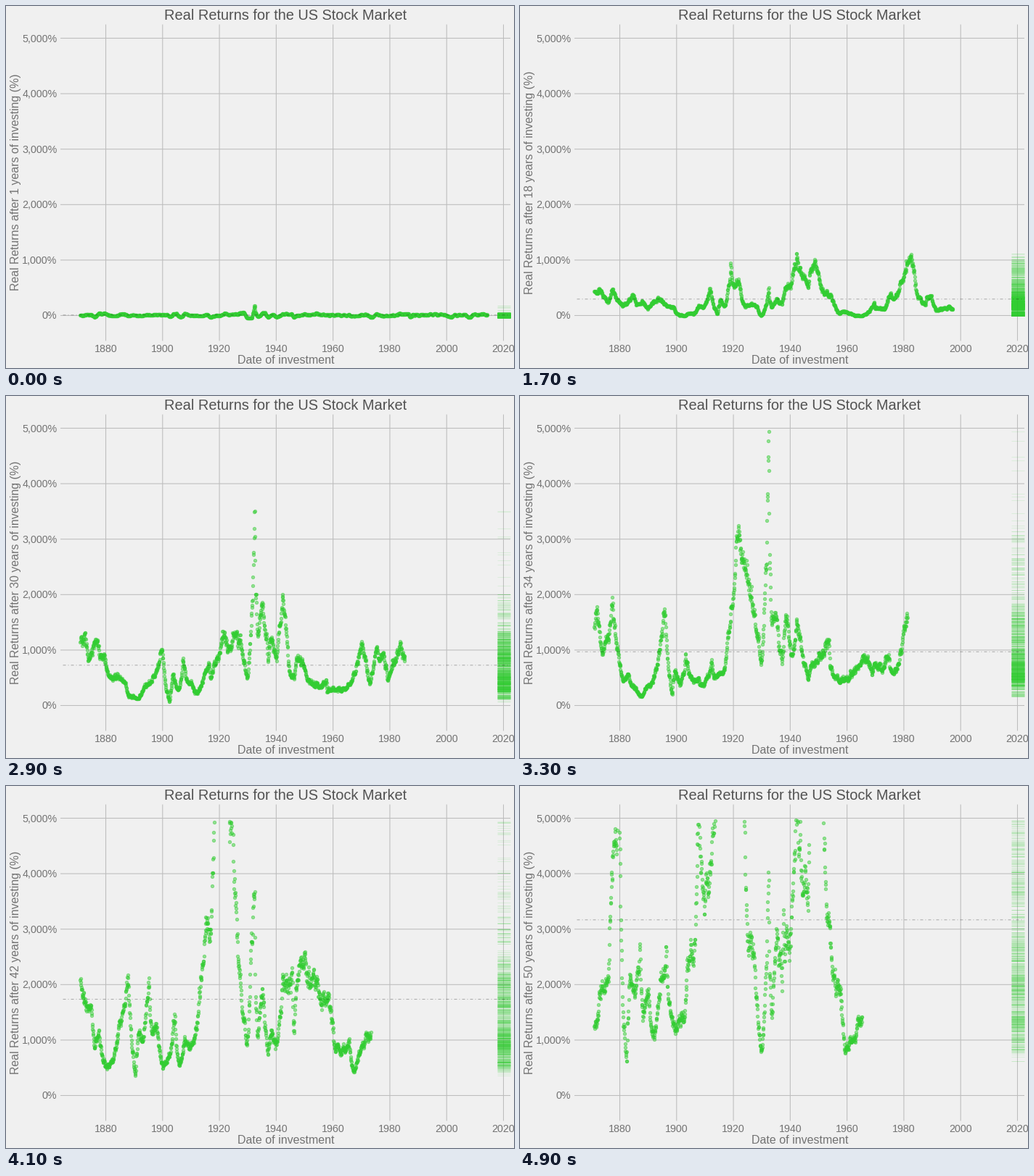
These frames come from a looping animation (700 by 500 pixels, 5 s). A matplotlib script:

```python
import matplotlib.pyplot as plt
import numpy as np
from matplotlib.animation import FuncAnimation

WIDTH, HEIGHT, DPI = 700, 500, 100
PX = 72 / DPI  # points per pixel
FRAMES, INTERVAL = 50, 100
LEFT, RIGHT, TOP, BOTTOM = 78.5, 695, 25.5, 459
TICK, RUG_LEFT = 3.5, 676.5
BACKGROUND, GRID, LABEL, TITLE, GREEN = "#f0f0f0", "#bdbdbd", "#737373", "#525252", "#32cd32"
plt.rcParams["font.family"] = "Liberation Sans"

# Major turning points of the inflation-adjusted price level
PRICES = {
    1871: 36, 1876: 41, 1877.42: 26.5, 1881.42: 70, 1885: 51, 1887.4: 72,
    1892: 75, 1893.58: 58, 1897: 65, 1902.67: 107, 1903.75: 75, 1906: 116,
    1907.83: 70, 1909.58: 108, 1913: 95, 1915: 74, 1916.83: 89, 1918: 50,
    1920.92: 36, 1927: 77, 1929.67: 181, 1930.25: 145, 1932.42: 35,
    1932.67: 62, 1933.5: 86, 1935.17: 62, 1937.08: 128, 1938.25: 72,
    1939.75: 90, 1942.25: 49, 1946.33: 101, 1947: 69, 1949.42: 60, 1954: 95,
    1956: 165, 1966: 290, 1970.42: 200, 1973: 275, 1974.92: 132, 1976.5: 180,
    1982.5: 114, 1987.58: 285, 1987.92: 212, 1994: 320, 2000.58: 855,
    2002.75: 480, 2007.75: 735, 2009.17: 360, 2015.25: 880,
}
# Inflation-adjusted yearly dividend
DIVIDENDS = {
    1871: 2.3, 1892: 3, 1910: 4.8, 1921: 2.8, 1930: 5.8, 1943: 3.5,
    1956: 6.1, 1969: 8.4, 1976: 7, 2002: 9, 2015: 16,
}


def interpolate(x, knots):
    return np.interp(x, list(knots), list(knots.values()))


def total_return_log(dates):
    log_price = interpolate(dates, {date: np.log(p) for date, p in PRICES.items()})
    income = interpolate(dates, DIVIDENDS) / np.exp(log_price) / 12
    rng = np.random.default_rng(7)
    noise = np.zeros(len(dates))
    for i in range(1, len(dates)):
        noise[i] = 0.75 * noise[i - 1] + rng.normal(0, 0.026)
    return log_price + np.cumsum(income) + noise


def year_x(year):
    return 137.5 + (year - 1880) * 548 / 140


def percent_y(percent):
    return 427.5 - percent * 383 / 5000


dates = 1871 + np.arange(144 * 12 + 4) / 12
log_index = total_return_log(dates)

fig = plt.figure(figsize=(WIDTH / DPI, HEIGHT / DPI), dpi=DPI, facecolor=BACKGROUND)
ax = fig.add_axes([0, 0, 1, 1])
ax.set(xlim=(0, WIDTH), ylim=(HEIGHT, 0))
ax.axis("off")


def text(x, y, content, size, color=LABEL, ha="center", **kwargs):
    return ax.text(x, y, content, fontsize=size * PX, color=color, ha=ha,
                   va="baseline", **kwargs)


def grid_line(xs, ys):
    ax.plot(xs, ys, color=GRID, lw=1.07 * PX, zorder=1, snap=False, solid_capstyle="butt")


for percent in range(0, 5001, 1000):
    y = percent_y(percent)
    grid_line([LEFT - TICK, RIGHT], [y, y])
    text(70.5, y + 5, f"{percent:,}%", 14.3, ha="right")
for year in range(1880, 2021, 20):
    x = year_x(year)
    grid_line([x, x], [TOP, BOTTOM + TICK])
    text(x, 478, str(year), 14.3)

text(385, 19, "Real Returns for the US Stock Market", 20, TITLE)
text(385.5, 494, "Date of investment", 16)
y_label = text(18, 243.5, "", 15.9, rotation=90, rotation_mode="anchor")

dots = ax.scatter([], [], s=(4.4 * PX) ** 2, facecolor=GREEN, edgecolor=GREEN,
                  linewidth=0.9 * PX, alpha=0.5, zorder=2)
rug = ax.hlines([0], RUG_LEFT, RIGHT, color=GREEN, lw=PX, alpha=0.11, zorder=2)
average_line, = ax.plot([], [], color="black", alpha=0.3, lw=PX, snap=False,
                        dashes=(4, 3, 1, 3), zorder=3)


def update(frame):
    years = frame + 1
    lag = 12 * years
    returns = 100 * np.expm1(log_index[lag:] - log_index[:-lag])
    shown = returns <= 5000
    ys = percent_y(returns[shown])
    dots.set_offsets(np.column_stack([year_x(dates[:-lag][shown]), ys]))
    rug.set_segments([[(RUG_LEFT, y), (RIGHT, y)] for y in ys])
    average_line.set_data([LEFT, RIGHT], [percent_y(returns.mean())] * 2)
    y_label.set_text(f"Real Returns after {years} years of investing (%)")
    return dots, rug, average_line, y_label


animation = FuncAnimation(fig, update, frames=FRAMES, interval=INTERVAL,
                          repeat=True, repeat_delay=0, blit=False)
plt.show()
```
